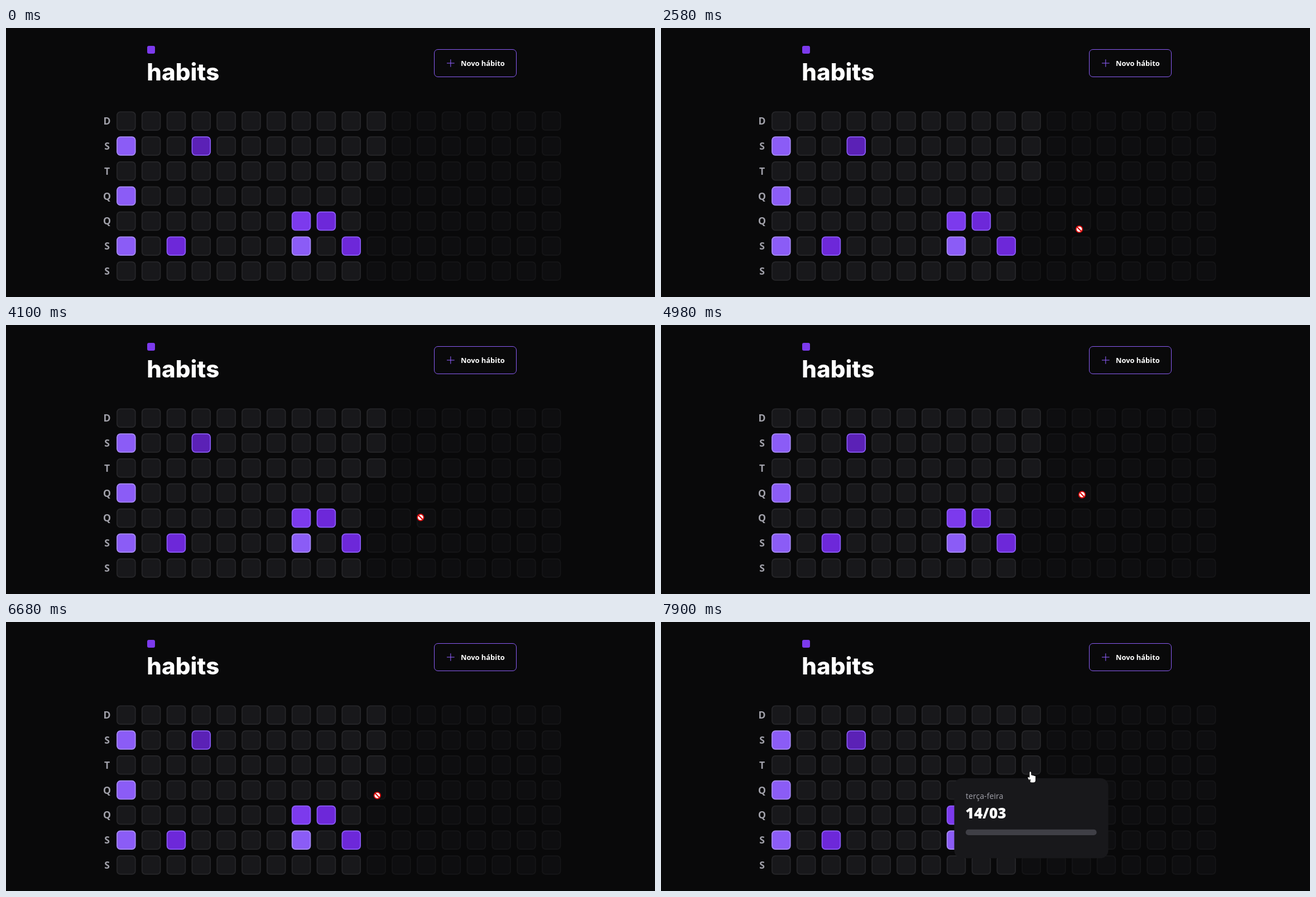
Recreate the animation shown at these times as an HTML page with a canvas. Size 1163 px wide and 482 px high, loop 8 s.

```html
<!DOCTYPE html>
<html lang="pt-BR">
<head>
<meta charset="utf-8">
<title>Habits</title>
<style>
  html, body { margin: 0; width: 100%; height: 100%; overflow: hidden; background: #09090a; }
  canvas { display: block; }
</style>
</head>
<body>
<canvas id="stage" width="1163" height="482"></canvas>
<script>
const ctx = document.getElementById('stage').getContext('2d');
const LOOP = 8000;
const STEP_MS = 69;
const POPUP_AT = 7900;
const SANS = '"Open Sans", "Noto Sans", sans-serif';

const BG = '#09090a', PANEL = '#18181b', EDGE = '#27272a', TRACK = '#3f3f46', MUTED = '#a1a1aa';
const VIOLETS = ['#4c1d95', '#5b21b6', '#6d28d9', '#7c3aed', '#8b5cf6', '#a78bfa'];
const ACCENT = VIOLETS[4];

// One entry per weekday: letter, then the completion level of each week (0 when left out).
const WEEK = ['D', 'S5002', 'T', 'Q5', 'Q000000043', 'S5030000503', 'S'];
const WEEKS = 18;
const TODAY = { week: 10, day: 2 };
const GRID = { x: 198.1, y: 149.4, pitch: 44.82, size: 34.5 };

// Pointer strokes: each runs from the previous resting place to `to`, passing `via` halfway.
const ENTRY = [1114, 424];
const STROKES = [
  { start: 670, end: 1080, to: [1054, 386], via: [1077, 371] },
  { start: 1360, end: 1500, to: [1037, 380] },
  { start: 1830, end: 2110, to: [814, 364.5] },
  { start: 2440, end: 2580, to: [749, 360] },
  { start: 2650, end: 2870, to: [749, 363], via: [706, 341] },
  { start: 3200, end: 3540, to: [681, 310], via: [702, 338] },
  { start: 3610, end: 3960, to: [737, 352], via: [656, 317] },
  { start: 4030, end: 4650, to: [751, 304], via: [748, 331] },
  { start: 4980, end: 5250, to: [790, 303], via: [763, 303] },
  { start: 5470, end: 5810, to: [793, 357] },
  { start: 6010, end: 6420, to: [667, 326.5], via: [770, 342] },
  { start: 6680, end: 7110, to: [660, 276], via: [661, 283] },
  { start: 7310, end: 7720, to: [667, 235], via: [655, 258] },
  { start: POPUP_AT, end: POPUP_AT, to: [662, 268] },
];

function roundBox(x, y, w, h, r, fill, border, width = 0) {
  ctx.beginPath();
  ctx.roundRect(x + width / 2, y + width / 2, w - width, h - width, r - width / 2);
  ctx.fillStyle = fill;
  ctx.fill();
  if (!border) return;
  ctx.strokeStyle = border;
  ctx.lineWidth = width;
  ctx.stroke();
}

function label(text, x, y, font, color, align = 'left') {
  ctx.font = font;
  ctx.fillStyle = color;
  ctx.textAlign = align;
  ctx.fillText(text, x, y);
}

function line(x1, y1, x2, y2, color, width) {
  ctx.beginPath();
  ctx.moveTo(x1, y1);
  ctx.lineTo(x2, y2);
  ctx.strokeStyle = color;
  ctx.lineWidth = width;
  ctx.stroke();
}

function polygon(...points) {
  ctx.beginPath();
  points.forEach(([x, y]) => ctx.lineTo(x, y));
  ctx.closePath();
}

const isFuture = (week, day) => week > TODAY.week || (week === TODAY.week && day > TODAY.day);

function drawHeader() {
  roundBox(253, 32, 14, 14, 3, VIOLETS[3]);
  label('habits', 252.3, 94.3, '800 42px Inter, sans-serif', '#fff');
  roundBox(767, 38, 148, 50, 7, BG, ACCENT, 1);
  line(790, 63, 803.6, 63, ACCENT, 1.1);
  line(796.8, 56.2, 796.8, 69.8, ACCENT, 1.1);
  label('Novo hábito', 815, 68, `700 12.9px ${SANS}`, '#fff');
}

function drawGrid() {
  const { x, y, pitch, size } = GRID;
  WEEK.forEach(([letter, ...levels], day) => {
    const top = y + day * pitch;
    label(letter, 181, top + 23.8, `700 17.6px ${SANS}`, MUTED, 'center');
    for (let week = 0; week < WEEKS; week++) {
      const level = Number(levels[week] || 0);
      const fill = level ? VIOLETS[level - 1] : PANEL;
      const border = level ? VIOLETS[Math.max(level, 4)] : EDGE;
      ctx.globalAlpha = isFuture(week, day) ? 0.4 : 1;
      roundBox(x + week * pitch, top, size, size, 6.9, fill, border, 1.72);
    }
    ctx.globalAlpha = 1;
  });
}

function drawPopup() {
  polygon([656.5, 280.5], [670.3, 280.5], [663.4, 273.6]);
  ctx.fillStyle = PANEL;
  ctx.fill();
  roundBox(525.5, 280, 276, 143.3, 14, PANEL);
  label('terça-feira', 546, 316.5, `400 14.2px ${SANS}`, MUTED);
  label('14/03', 545.5, 351.5, `800 26.3px ${SANS}`, '#fff');
  roundBox(546, 371.8, 234.6, 10.3, 5.1, TRACK);
}

function paintPointer() {
  ctx.lineJoin = 'round';
  ctx.strokeStyle = '#000';
  ctx.lineWidth = 1.4;
  ctx.stroke();
  ctx.fillStyle = '#fff';
  ctx.fill();
}

const pointers = {
  arrow() {
    polygon([0.3, 0.3], [0.3, 13.6], [3.3, 10.9], [5.4, 15.6], [7.5, 14.7], [5.5, 10.2], [9.6, 10.2]);
    paintPointer();
  },
  blocked() {
    const red = '#d90b0b';
    roundBox(-6.2, -6.2, 13.4, 13.4, 6.7, '#fff', red, 1.9);
    line(-3.5, -3.5, 4.5, 4.5, red, 2.1);
  },
  hand() {
    ctx.beginPath();
    for (let finger = 0; finger < 4; finger++) {
      const top = finger ? 5.6 + finger * 0.7 : 0.3;
      ctx.roundRect(-1.5 + finger * 2.6, top, 2.8, 14 - top, 1.4);
    }
    ctx.roundRect(-1.5, 9, 10.6, 10.4, [0, 0, 4, 4]);
    ctx.moveTo(-1.5, 11);
    ctx.quadraticCurveTo(-5.6, 8.4, -4.4, 12);
    ctx.lineTo(0, 18.6);
    ctx.lineTo(0, 11);
    ctx.closePath();
    paintPointer();
  },
};

// Parabola through a, then m halfway, then b.
const through = (a, m, b, u) => a * (1 - u) * (1 - 2 * u) + 4 * m * u * (1 - u) + b * u * (2 * u - 1);

function pointerAt(t) {
  let spot = ENTRY;
  for (const { start, end, to, via } of STROKES) {
    if (t < start) break;
    const steps = Math.round((end - start) / STEP_MS) + 1;
    const passed = t >= end ? steps : 1 + Math.floor((t - start) / (end - start) * (steps - 1));
    const u = passed / steps;
    spot = spot.map((from, i) => through(from, via ? via[i] : (from + to[i]) / 2, to[i], u));
  }
  return spot;
}

// The pointer's shape follows from what lies under it.
function pointerShape([x, y]) {
  const { pitch, size } = GRID;
  const dx = x - GRID.x, dy = y - GRID.y;
  const week = Math.floor(dx / pitch), day = Math.floor(dy / pitch);
  const reach = size + 0.7;
  if (week >= WEEKS || dx - week * pitch > reach || dy - day * pitch > reach) return 'arrow';
  return isFuture(week, day) ? 'blocked' : 'hand';
}

function draw(t) {
  ctx.fillStyle = BG;
  ctx.fillRect(0, 0, 1163, 482);
  drawHeader();
  drawGrid();
  if (t >= POPUP_AT) drawPopup();
  if (t < STROKES[0].start) return;
  const spot = pointerAt(t);
  ctx.save();
  ctx.translate(...spot);
  pointers[pointerShape(spot)]();
  ctx.restore();
}

const began = performance.now();
function tick() {
  draw((performance.now() - began) % LOOP);
  requestAnimationFrame(tick);
}
tick();
</script>
</body>
</html>
```
